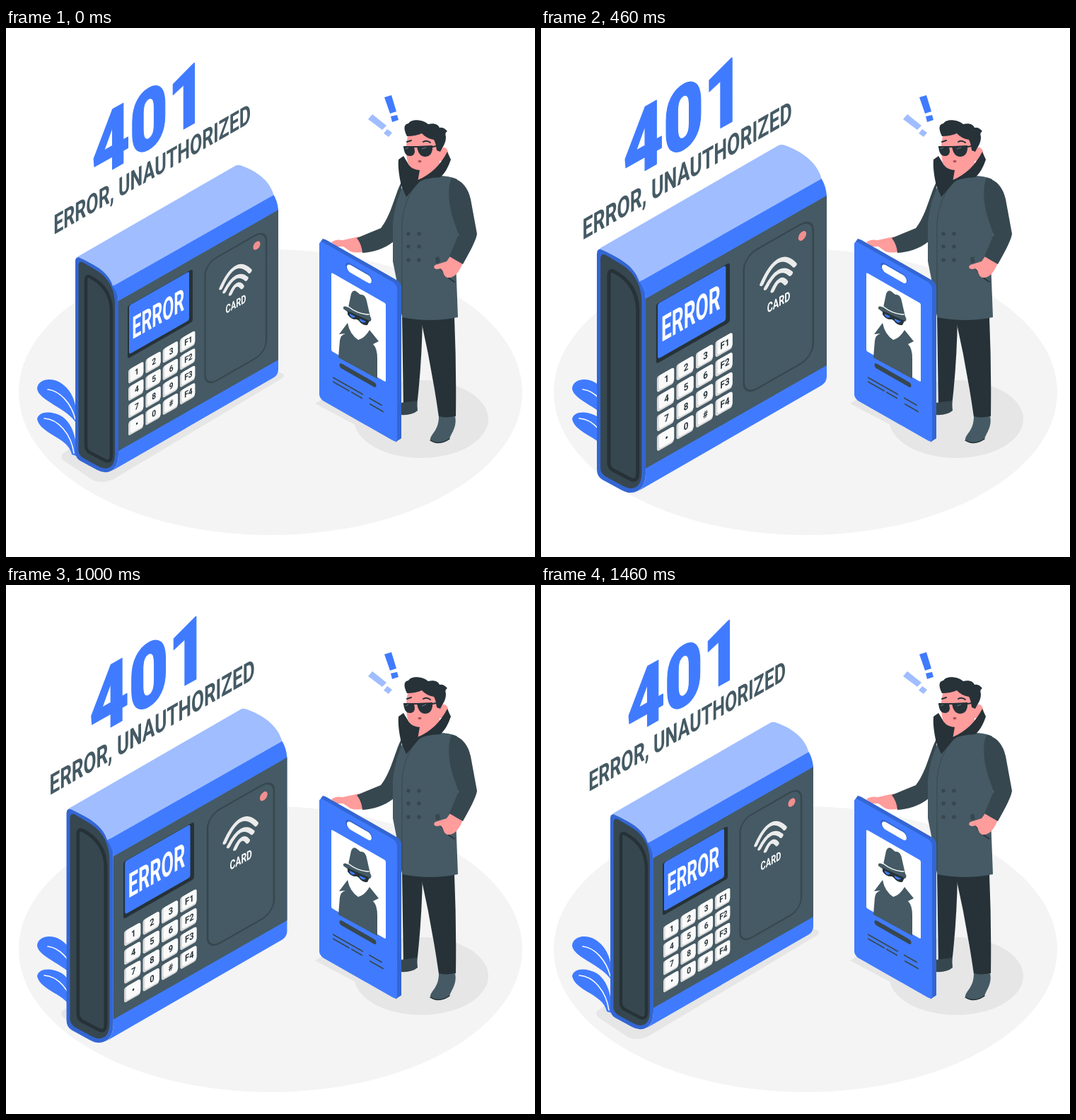
An HTML page for the animation above (1500 ms loop, 748x748 px).

```html
<!DOCTYPE html>
<html lang="en">
<head>
<meta charset="utf-8">
<title>401</title>
<style>
  html, body { margin: 0; width: 100%; height: 100%; overflow: hidden; background: #fff; }
  svg { display: block; width: 100%; height: 100%; }
  text { font-family: Roboto, sans-serif; font-weight: 700; }
  #device { transform-origin: 241.5px 410.5px; }
  #title { transform-origin: 207.5px 171px; }
  .blue { fill: #407bff; }
  .navy { fill: #3366d3; }
  .slate { fill: #455a64; }
  .steel { fill: #37474f; }
  .ink { fill: #263238; }
  .skin { fill: #ff9c9c; }
  .line { fill: none; stroke-linecap: round; stroke-linejoin: round; }
</style>
</head>
<body>
<svg viewBox="0 0 748 748">
  <ellipse cx="374" cy="515" rx="356" ry="202" fill="#f4f4f4"/>
  <g fill="#e6e6e6">
    <path d="M79 603Q84 598 100 590L380 486Q398 487 391 495L152 638Q138 645 124 640L82 612Q77 608 79 603Z"/>
    <ellipse cx="587" cy="553" rx="95" ry="55"/>
    <path d="M437 531L450 523L560 585L548 590Z"/>
  </g>

  <g id="plant">
    <path class="blue" d="M100 560C88 538 46 527 44 510C45 496 64 494 76 501C96 513 101 535 100 560Z"/>
    <path class="blue" d="M93 603C88 578 49 575 44 553C46 542 63 541 77 548C95 558 101 584 99 605Z"/>
    <path class="line" stroke="#fff" stroke-width="1.5" d="M59 511C76 513 92 530 98 553M54 552C74 553 92 574 96 601"/>
  </g>

  <g id="device">
    <path class="navy" d="M98 330Q98 323 104 324L132 339Q159 356 159 388V602Q159 621 149 626Q140 631 129 625L105 612Q98 608 98 599Z"/>
    <path class="steel" d="M102.500 336Q103 328 110 332L130 344Q153 359 154 389V602Q154 617 147 621Q140 625 131 620L109 608Q103 604 102.500 598Z"/>
    <path class="line" stroke="#263238" stroke-width="4.500" d="M113 357Q113 348 121 353Q148 368 149 399V604Q149 616 139 611L118 600Q113 597 113 590Z"/>
    <path fill="#a0bdff" d="M101 323.500L324 195Q327 193 331 194C352 201 373 215 378.500 236L151 365C146 347 128 335 101 323.500Z"/>
    <path class="blue" d="M151 365L378.500 236Q384 245 385 257V483Q385 490 379 494L150 626Q159 620 159 602V386Q158 375 151 365Z"/>
    <g transform="matrix(1 -.57 0 1 159 386)">
      <rect class="slate" width="226" height="212"/>
      <rect class="ink" x="13" y="14.500" width="92" height="74.500" rx="3"/>
      <rect class="blue" x="15" y="15" width="85" height="69" rx="3"/>
      <text transform="translate(19.300 65.400) scale(.535 1)" font-size="43.600" fill="#fff">ERROR</text>
      <rect class="line" x="122.500" y="17.500" width="86.500" height="174" rx="16" stroke="#37474f" stroke-width="2.300"/>
      <ellipse cx="195.500" cy="33" rx="5" ry="5.500" fill="#f28f8f"/>
      <path class="line" stroke="#ebebeb" stroke-width="5.300" d="M145 64Q165 30 186 64M150 72Q166 50 181 72M158.500 80Q167 65 175 80"/>
      <text transform="translate(151.500 104.500) scale(.67 1)" font-size="16.500" fill="#fff">CARD</text>
      <g id="keys" text-anchor="middle" font-size="12"></g>
    </g>
  </g>

  <g id="title">
    <text class="blue" transform="matrix(.777 -.438 0 1 121.500 216)" font-size="119" style="font-weight:900"
      stroke="#407bff" stroke-width="1.500" stroke-linejoin="round">401</text>
    <text class="slate" transform="matrix(.66 -.377 0 1 67.200 292.500)" font-size="38">ERROR, UNAUTHORIZED</text>
  </g>

  <g id="alert">
    <path class="blue" d="M535 98L545 95L552 118L543 121ZM544 125L553 123L555 130L546 133Z"/>
    <path fill="#a0bdff" d="M512 129L518 122L538 138L532 144ZM534 149L539 143L546 148L541 154Z"/>
  </g>

  <g id="man">
    <path class="ink" d="M560 406L589 409Q588 475 581 534L562 536Z"/>
    <path class="steel" d="M558 530L581 527L582 541Q574 548 558 547Z"/>
    <path class="ink" d="M586 409H634Q637 480 636 549Q622 553 612 550Q602 480 586 409Z"/>
    <path class="slate" d="M612 549Q623 552 635 549C638 564 630 572 627 581C619 589 602 588 600 582C600 574 612 570 612 549Z"/>
    <path class="line" stroke="#263238" stroke-width="1.500" d="M600 583Q612 591 627 581"/>
    <path class="skin" d="M460 303Q466 298 476 300L499 295L506 316Q496 319 487 316L477 309L467 309Z"/>
    <path class="steel" d="M559 218C551 232 545 264 530 283L496 297Q503 306 504 318C522 317 540 310 551 299L560 250Z"/>
    <path class="slate" d="M564 218C590 208 622 206 638 214L640 290L636 330L639 409Q600 417 560 409L553 360L547 330V276Q550 244 564 218Z"/>
    <path class="line" stroke="#37474f" stroke-width="1" d="M581 219Q562 244 560 276V405"/>
    <g id="buttons" class="steel"></g>
    <path class="steel" d="M607 325L612 323L614 331L608 333Z"/>
    <path class="line" stroke="#263238" stroke-width="1.500" d="M612 334Q618 350 634 359"/>
    <path class="skin" d="M630 320L646 332C641 345 634 354 624 353C617 350 620 344 614 340C606 343 603 338 607 335L623 330Z"/>
    <path class="steel" d="M630 212C646 215 654 228 657 242L666 291C665 300 655 318 646 334Q637 329 627 323L640 292L634 275C625 250 624 225 630 212Z"/>
    <path class="ink" d="M555 186L562 181L570 194L606 198L584 218L566 239L559 223C556 210 554 196 555 186Z"/>
    <path class="skin" d="M569 149C566 160 565 172 567 185C568 195 574 200 585 201L582 218L613 200V188C621 190 627 182 625 175C623 167 616 167 612 174L606 153L590 146Z"/>
    <path class="ink" d="M624 175L629 186C625 198 620 206 614 211C600 212 589 213 581 220L566 239L582 215C600 208 615 193 624 175Z"/>
    <path class="ink" d="M567 153C562 143 562 136 569 135C573 128 589 129 597 136C605 134 611 136 613 141Q619 140 624 146Q620 148 622 154C622 163 618 167 614 175L609 173C608 166 607 161 605 158Q594 156 588 149Q579 153 567 153Z"/>
    <path class="line" stroke="#263238" stroke-width="2" d="M567 161L573 159M590 161Q595 158 600 162M563 168H603L614 166"/>
    <path class="ink" d="M562 167H577L578 175Q577 181 571 181Q563 181 562 167ZM581 167L603 166Q604 181 593 182Q583 182 581 167Z"/>
    <path d="M565 171L569 169M588 171L594 169" stroke="#607d8b"/>
    <ellipse cx="585" cy="188.500" rx="2.500" ry="1.800" fill="#a95555"/>
  </g>

  <g id="badge">
    <g transform="matrix(1 .57 0 1 443 300)">
      <rect class="navy" x="4" y="-6" width="112" height="224" rx="6"/>
      <path class="navy" d="M0 5L5 -5H108L116 0V214L108 224Z"/>
      <rect class="blue" width="110" height="224" rx="6"/>
      <rect class="navy" x="37" y="8" width="38" height="13" rx="6.500"/>
      <rect fill="#fff" x="39" y="10" width="35" height="11" rx="5.500"/>
      <rect fill="#fff" x="17" y="36" width="77" height="111" rx="2"/>
      <path class="line" stroke="#37474f" stroke-width="7" d="M32 160H77"/>
      <path class="line" stroke="#37474f" stroke-width="2" d="M20 183H61M71 183H88M20 189H42M46 189H60M72 191H90"/>
    </g>
    <path class="slate" d="M470 466L472 442Q473 434 480 432L471 433L483 417Q486 433 498 441Q507 439 514 427L527 443L519 447Q525 453 525 467V496Z"/>
    <path fill="#fff" d="M485 408Q484 428 498 434Q509 433 512 419Z"/>
    <path class="slate" d="M484 395L488 376Q491 369 496 373L501 377Q508 376 510 386L515 408Q518 412 515 415Q495 412 477 397Q476 391 484 395Z"/>
    <path class="line" stroke="#fff" stroke-width="1.500" d="M484 394Q498 405 513 405"/>
    <path class="ink" d="M483 400L514 414L511 420Q504 421 499 414L496 412Q488 413 483 405Z"/>
    <path class="blue" d="M486 404L494 408Q490 412 486 406ZM500 411L509 415Q505 419 500 413Z"/>
  </g>
</svg>
<script>
  const $ = id => document.getElementById(id);

  const labels = ['1', '2', '3', 'F1', '4', '5', '6', 'F2', '7', '8', '9', 'F3', '•', '0', '#', 'F4'];
  $('keys').innerHTML = labels.map((label, i) => {
    const col = i % 4, row = i >> 2;
    const x = 14 + col * 24.3, y = 105.5 + row * 24.5 - col * .7;
    return `<g transform="translate(${x} ${y})">
      <rect width="21" height="20" rx="3" fill="#d9d9d9"/>
      <rect x="2.5" width="19" height="18" rx="3" fill="#fafafa"/>
      <text class="ink" transform="translate(12 13.5) scale(.85 1)">${label}</text></g>`;
  }).join('');

  $('buttons').innerHTML = [291, 309, 328].map(y =>
    `<circle cx="569" cy="${y}" r="2.8"/><circle cx="584" cy="${y}" r="2.8"/>`).join('');

  // Double heartbeat: growth of the device at every seventh tick of a 24 fps clock.
  const LOOP = 1500, TICK = 1000 / 24, SPAN = 7;
  const beats = [0, .195, .09, .004, .209, 0];
  const ease = u => .7 * u * u * (3 - 2 * u) + .3 * u;

  function growth(tick) {
    if (tick >= 35) return 0;
    const i = Math.floor(tick / SPAN);
    return beats[i] + (beats[i + 1] - beats[i]) * ease(tick / SPAN - i);
  }

  const start = performance.now();
  function draw(now) {
    const time = Math.max(0, now - start) % LOOP;
    const grow = growth(Math.floor((time + 5) / TICK) % 36);
    $('device').style.transform = `scale(${1 + grow})`;
    $('title').style.transform = `scale(${1 + grow * .47})`;
    requestAnimationFrame(draw);
  }
  draw(start);
</script>
</body>
</html>
```
